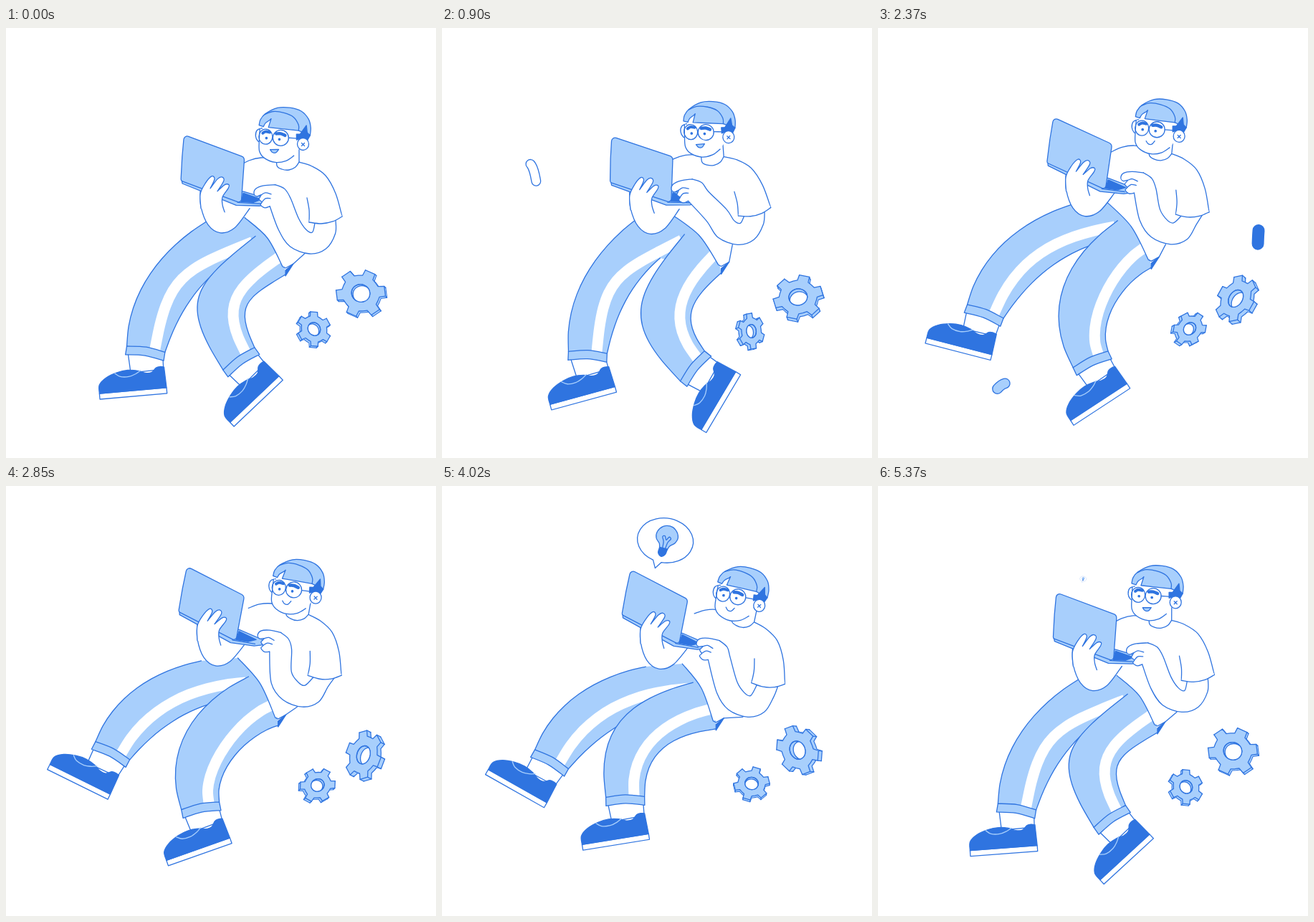
An HTML page with a canvas that plays this animation: 600x600 px, repeating every 5400 ms.

```html
<!DOCTYPE html>
<html lang="en">
<head>
<meta charset="utf-8">
<title>Working in the air</title>
<style>
html, body { margin: 0; width: 100%; height: 100%; overflow: hidden; background: #fff; }
canvas { display: block; width: 600px; height: 600px; }
</style>
</head>
<body>
<canvas id="stage" width="600" height="600"></canvas>
<script>
const g = document.getElementById('stage').getContext('2d');
const LOOP = 5400, BLUE = '#2f74e0', LIGHT = '#a8cffc', WHITE = '#fff', LINE = 1.3;

let phase = 0;
// Everything sways with the loop: a mean plus first and second harmonics.
const wave = (mean, c = 0, s = 0, c2 = 0, s2 = 0) =>
  mean + c * Math.cos(phase) + s * Math.sin(phase) + c2 * Math.cos(2 * phase) + s2 * Math.sin(2 * phase);

const rad = d => d * Math.PI / 180;
const mix = (a, b, k) => a.map((v, i) => v + (b[i] - v) * k);
const add = (p, x, y) => [p[0] + x, p[1] + y];
const polar = (p, r, ang) => add(p, r * Math.cos(ang), r * Math.sin(ang));
const P = (...n) => n.reduce((r, v, i) => (i % 2 ? r[r.length - 1].push(v) : r.push([v]), r), []);
const poly = (...n) => P(...n).map(p => [p]);

// Joints as x, y and turn in degrees.
const joints = () => ({
  head: [wave(421.5, -7, -21), wave(158, 4, -9), wave(.8, -1.5, -5)],
  laptop: [wave(242.5, 2.5, -9.5), wave(196, 17, 15.5, 0, -3), wave(2.6, -3, -4)],
  chest: [wave(467.5, 1.5, -11), wave(262.5, .5, -14), wave(4.4, -4.4, -7.5)],
  hand: [wave(341, -1, -20, 6), wave(219.5, 11.5), wave(6.5, -7, -9)],
  elbow: [wave(-6.5, 6, -9.5), wave(-5.5, 4.5, -12)],
  waist: [wave(327.5, 5.5, -8), wave(252.5, 12, 4)],
  hem: [wave(385, 5, 2.5), wave(341, 5)],
  backFoot: [wave(95, 36, 34, 0, 12), wave(463, 55, 58, 0, -9), wave(9, -14, -20)],
  frontFoot: [wave(279, 39, 81), wave(543, 9, 30, 4, -8), wave(-33.5, -10, -24)]
});

function curve(pts, start) {
  g[start ? 'moveTo' : 'lineTo'](...pts[0]);
  for (let i = 0; i < pts.length - 1; i++) {
    const b = pts[i], c = pts[i + 1], a = pts[i - 1] || b, d = pts[i + 2] || c;
    g.bezierCurveTo(b[0] + (c[0] - a[0]) / 6, b[1] + (c[1] - a[1]) / 6,
      c[0] - (d[0] - b[0]) / 6, c[1] - (d[1] - b[1]) / 6, ...c);
  }
}

// Smooth runs joined by straight lines.
function shape(runs, fill, line = BLUE, closed = true, width = LINE) {
  g.beginPath();
  runs.forEach((r, i) => curve(r, !i));
  if (closed) g.closePath();
  paint(fill, line, width);
}
function paint(fill, line = BLUE, width = LINE) {
  if (fill) { g.fillStyle = fill; g.fill(); }
  if (line) { g.strokeStyle = line; g.lineWidth = width; g.stroke(); }
}
const stroke = (pts, line, width) => shape([pts], null, line, false, width);
function oval(x, y, rx, ry, fill, line) {
  g.beginPath();
  g.ellipse(x, y, rx, ry, 0, 0, 7);
  paint(fill, line);
}

// An arc from a to b that leaves and arrives at the given angles off the chord.
function bow(a, b, k, leave, arrive) {
  const dx = b[0] - a[0], dy = b[1] - a[1];
  const len = Math.hypot(dx, dy) * k, ang = Math.atan2(dy, dx);
  const c = polar(a, len, ang + rad(leave)), d = polar(b, -len, ang - rad(arrive));
  return Array.from({ length: 9 }, (_, i) => {
    const u = i / 8, ab = mix(a, c, u), cd = mix(c, d, u), de = mix(d, b, u);
    return mix(mix(ab, cd, u), mix(cd, de, u), u);
  });
}

// Maps rest coordinates around a pivot to the posed joint.
function bone([px, py], [x, y, deg]) {
  const c = Math.cos(rad(deg)), s = Math.sin(rad(deg));
  return (...n) => P(...n).map(p => {
    const a = p[0] - px, b = p[1] - py;
    return [x + a * c - b * s, y + a * s + b * c];
  });
}
function posed([px, py], [x, y, deg], draw) {
  g.save();
  g.translate(x, y);
  g.rotate(rad(deg));
  g.translate(-px, -py);
  draw();
  g.restore();
}

function shoe() {
  shape(poly(0, 0, 94, 0, 94, -8, 0, -8), WHITE);
  shape([P(0, -8, 1, -20, 11, -29, 27, -35, 42, -37, 56, -35, 66, -31, 75, -31, 82, -37, 88, -38, 93, -37), [[94, -8]]], BLUE);
  stroke(P(24, -34, 31, -29, 43, -28, 53, -31, 60, -35), LIGHT, 1.3);
}

function cuffOf(foot, deg) {
  const [mid] = bone([0, 0], foot)(70, -64);
  return [polar(mid, -27, rad(deg)), polar(mid, 27, rad(deg)), rad(deg + 90)];
}

function leg(foot, [a, b, downward], out, inn, stripe, belt) {
  const onShoe = bone([0, 0], foot);
  const down = (p, k) => polar(p, k, downward);
  shape([[down(mix(a, b, .04), 6)], onShoe(46, -33), onShoe(92, -34), [down(mix(a, b, .96), 6)]], WHITE);
  posed([0, 0], foot, shoe);

  const back = [...inn].reverse();
  shape([out, back, ...belt], LIGHT, null);
  g.lineCap = 'butt';
  stroke(stripe, WHITE, 15);
  g.lineCap = 'round';
  stroke(out);
  stroke(back);
  const rim = k => [down(a, k), down(mix(a, b, .5), k - 3), down(b, k)];
  shape([rim(0), rim(12).reverse()], LIGHT);
}

function legs({ waist, hem, backFoot, frontFoot }) {
  const crease = add(waist, 15, 26);
  const belt = [[hem], [add(mix(waist, hem, .5), 22, -18)], [waist]];

  const back = cuffOf(backFoot, backFoot[2] * .6 + 12);
  leg(backFoot, back,
    bow(add(waist, -51, 4), back[0], .36, 26, 32),
    bow(add(waist, -19, 59), back[1], .36, 20, 17),
    bow(add(crease, -4, 8), mix(back[0], back[1], .73), wave(.45, .07, .06), 26, 32), belt);

  const front = cuffOf(frontFoot, frontFoot[2] + 8);
  const bend = wave(.46, .13);
  leg(frontFoot, front,
    bow(crease, front[0], wave(.5, .09, .02), 38, 46),
    bow(add(hem, 0, -2), front[1], bend, 36, 48),
    bow(add(mix(waist, hem, .72), 8, -4), mix(front[0], front[1], .73), bend * .9, 36, 48), belt);
}

// Six-toothed disc, squashed along a turning axis, with a swaying thickness.
function gear({ x, y, size, squash, axis, spin, dx, dy }) {
  const phi = rad(axis), c = Math.cos(phi), s = Math.sin(phi);
  const at = (r, ang) => {
    const u = Math.cos(ang - phi) * r * size, v = Math.sin(ang - phi) * r * size * squash;
    return [x + u * c - v * s, y + u * s + v * c];
  };
  const rim = [], tips = [];
  for (let i = 0; i < 6; i++) {
    const tooth = (r, d) => at(r, rad(spin + i * 60 + d));
    tips.push(tooth(.97, -12), tooth(.97, 12));
    rim.push([tooth(.74, -17)], [tooth(.97, -12)], [tooth(.97, 12)], [tooth(.74, 17)], [tooth(.73, 30)]);
  }
  const hole = Array.from({ length: 17 }, (_, i) => at(.36, i * Math.PI / 8));
  for (let i = 5; i > 0; i--) {
    const k = i / 5;
    shape(rim.map(([p]) => [add(p, dx * k, dy * k)]), LIGHT, i === 5 ? BLUE : null);
  }
  for (const p of tips) stroke([p, add(p, dx, dy)]);
  shape(rim, LIGHT);
  shape([hole], LIGHT);
  g.save();
  g.clip();
  shape([hole.map(p => add(p, dx, dy))], WHITE);
  g.restore();
  shape([hole]);
}

function gears(k) {
  gear({ x: wave(497, -2, 1), y: wave(373, -3, 4.5), size: 36, squash: wave(.82, .12),
    axis: 22 - 180 * k, spin: -6 - 60 * k, dx: wave(3.5, -1.5, -1.5), dy: wave(2.5, -.5, 2) });
  gear({ x: wave(432.5, -2.5, .5), y: wave(419, 1, 4), size: 26, squash: wave(.85, 0, -.12, .05),
    axis: 55 + 180 * k, spin: 32 - 60 * k, dx: wave(-2.3, .2, -2), dy: wave(2, 0, -.5) });
}

function torso({ waist, hem, elbow }, chest) {
  const notch = add(hem, -4, -13), corner = add(hem, 11, -17), side = add([417, 316], ...elbow);
  const front = [waist, add(mix(waist, notch, .5), 5, -6), notch];
  const left = chest(326, 193, 340, 185, 357, 181, 380, 182);
  const right = chest(409, 187, 428, 193, 447, 206, 461, 231, 470, 263);
  shape([left, right, chest(424, 271), [side], [corner], [...front].reverse()], WHITE, null);
  shape([[corner], [hem], [add(notch, 4, 5)]], BLUE);
  shape([front, [add(notch, 4, 2)], [corner], [side]], null, BLUE, false);
  stroke(left);
  stroke(right);
  stroke(chest(424, 271, 424, 254, 421, 237));
}

function neck() {
  shape([P(379, 176, 379, 192, 386, 197, 396, 198, 405, 194, 410, 187), [[410, 160]]], WHITE, BLUE, false);
}

function laptop() {
  shape(poly(246, 211, 247, 217, 322, 248, 355, 249, 368, 246, 369, 240, 333, 229), LIGHT);
  stroke(P(324, 244, 356, 246));
  shape(poly(329, 243, 332, 231, 357, 240, 346, 244), BLUE);
  g.beginPath();
  g.moveTo(247, 180);
  g.arcTo(250, 149, 333, 181, 5);
  g.arcTo(334, 181, 329, 245, 6);
  g.arcTo(329, 245, 246, 213, 4);
  g.arcTo(245, 213, 249, 160, 3);
  g.closePath();
  paint(LIGHT);
}

function nearArm() {
  shape([P(272, 226, 273, 250, 283, 275, 300, 286, 320, 279, 341, 252)], WHITE, BLUE, false);
}
function fingers() {
  shape([
    P(273, 252, 272, 232, 279, 217, 288, 207, 292, 211, 286, 224),
    P(286, 224, 296, 211, 302, 208, 305, 213, 296, 228),
    P(296, 228, 306, 219, 312, 219, 311, 224, 303, 236, 303, 247, 306, 257)
  ], WHITE, BLUE, false);
}

function farArm(j, chest) {
  const hand = bone([346, 231], j.hand), elbow = (...n) => P(...n).map(p => add(p, ...j.elbow));
  const inner = [...hand(376, 219, 389, 225, 397, 238), ...elbow(409, 267, 419, 282, 428, 286), ...chest(432, 272)];
  const outer = [...chest(461, 268), ...elbow(460, 288, 447, 309, 424, 316, 397, 306, 381, 283), ...hand(368, 249)];
  const palm = hand(368, 249, 361, 251, 355, 247, 357, 243, 353, 239, 356, 233, 350, 235, 346, 231, 349, 224, 360, 220, 376, 219);
  shape([inner, outer, palm], WHITE, null);
  [inner, outer, palm, hand(356, 233, 362, 230, 370, 232), hand(357, 243, 362, 238, 369, 238)].forEach(p => stroke(p));
  const cuff = chest(470, 263, 457, 270, 441, 273, 424, 271);
  shape([cuff, chest(426, 262, 466, 254)], WHITE, null);
  stroke(cuff);
}

function head() {
  const jaw = P(355, 140, 354, 155, 354, 171, 361, 181, 376, 187, 391, 185, 402, 178);
  shape([P(358, 139, 351, 142, 349, 150, 352, 157, 357, 159)], WHITE);
  shape([jaw, P(410, 168, 410, 140)], WHITE, null);
  stroke(jaw);
  shape([P(354, 135, 356, 127, 363, 119, 380, 111, 397, 111, 413, 116, 423, 127, 426, 139, 425, 150),
    P(409, 143, 367, 138), [[371, 126]], P(369, 128, 363, 132, 360, 137)], LIGHT);
  shape(poly(406, 156, 406, 148, 411, 148, 420, 136, 421, 146, 425, 150, 421, 157, 415, 153), BLUE);
  stroke(P(362, 120, 374, 116, 389, 118, 402, 124, 409, 135, 409, 143));
  oval(415, 162, 8, 8.5, WHITE);
  stroke(P(413, 160.5, 417, 164.5));
  stroke(P(417, 160.5, 413, 164.5));
  stroke(P(359, 146, 363, 144, 369, 145), BLUE, 4);
  stroke(P(378, 147, 384, 147, 390, 149.5), BLUE, 4.5);
  oval(363, 151, 9.5, 10.5);
  oval(384, 153, 11, 11);
  stroke(P(395, 153, 407, 154));
  oval(364, 153, 1.2, 1.2, BLUE);
  oval(382, 155, 1.2, 1.2, BLUE);
  const smile = P(369, 169, 372, 173, 377, 173.5, 381, 169);
  if (wave(0, 1) > 0) shape([smile], LIGHT);
  else stroke(smile);
}

// Springs open, sways to rest and shrinks just before the loop ends.
function bubble(t, at) {
  const u = (t - 2860) / 1000, rest = Math.min(1, (5380 - t) / 240);
  if (u <= 0 || rest <= 0) return;
  const scale = (1 - Math.exp(-3.2 * u) * Math.cos(9.4 * u)) * rest * (3.2 - 2.2 * rest);
  const [corner] = bone([246, 213], at)(250, 150);
  g.save();
  g.translate(corner[0] + 36, corner[1] - 17);
  g.rotate(rad(2 + 28 * Math.exp(-1.4 * u)));
  g.scale(scale, scale);
  g.translate(9, -26);
  g.beginPath();
  g.ellipse(0, 0, 39, 31, 0, rad(110), rad(452));
  g.lineTo(-9, 40);
  g.closePath();
  paint(WHITE);
  g.rotate(rad(8));
  shape([P(-5, 12, -7, 6, -13, 0, -14, -9, -8, -18, 1, -21, 10, -18, 16, -9, 14, 0, 8, 6, 6, 12)], LIGHT);
  shape([P(-5, 11, -5, 19, 0, 23, 5, 19, 6, 11)], BLUE);
  stroke(P(-1, 11, -2, 2, -5, -4, -2, -6, 1, -1, 4, -6, 7, -4, 4, 2, 3, 11));
  g.restore();
}

// A short capsule that crawls along a path between two times.
function worm(t, from, to, len, width, color, path) {
  const p = (t - from) / (to - from);
  if (p <= 0 || p >= 1) return;
  const tail = p * p * len, tip = (1 - (1 - p) ** 2) * len;
  g.save();
  g.setLineDash([tip - tail, 999]);
  g.lineDashOffset = -tail;
  stroke(path, BLUE, width);
  stroke(path, color, width - 2.6);
  g.restore();
}

function worms(t) {
  worm(t, 400, 975, 113, 14, WHITE, P(120, 125, 97, 145, 104, 172, 125, 192, 132, 217));
  worm(t, 1584, 2429, 103, 15, LIGHT, P(227, 541, 210, 536, 214, 515, 203, 495, 177, 496, 165, 505));
  worm(t, 1900, 2428, 96, 17, BLUE, P(569, 225, 550, 232, 534, 255, 531, 283, 530, 303));
}

function draw(t) {
  phase = 2 * Math.PI * t / LOOP;
  g.clearRect(0, 0, 600, 600);
  g.lineJoin = g.lineCap = 'round';
  const j = joints(), chest = bone([470, 263], j.chest);
  const wrist = [j.laptop[0], j.laptop[1], j.laptop[2] * .4];

  worms(t);
  gears(t / LOOP);
  legs(j);
  torso(j, chest);
  posed([470, 263], j.chest, neck);
  posed([246, 213], wrist, nearArm);
  posed([246, 213], j.laptop, laptop);
  posed([246, 213], wrist, fingers);
  farArm(j, chest);
  posed([415, 162], j.head, head);
  bubble(t, j.laptop);
}

const begin = performance.now();
function tick() {
  draw((performance.now() - begin) % LOOP);
  requestAnimationFrame(tick);
}
tick();
</script>
</body>
</html>
```
